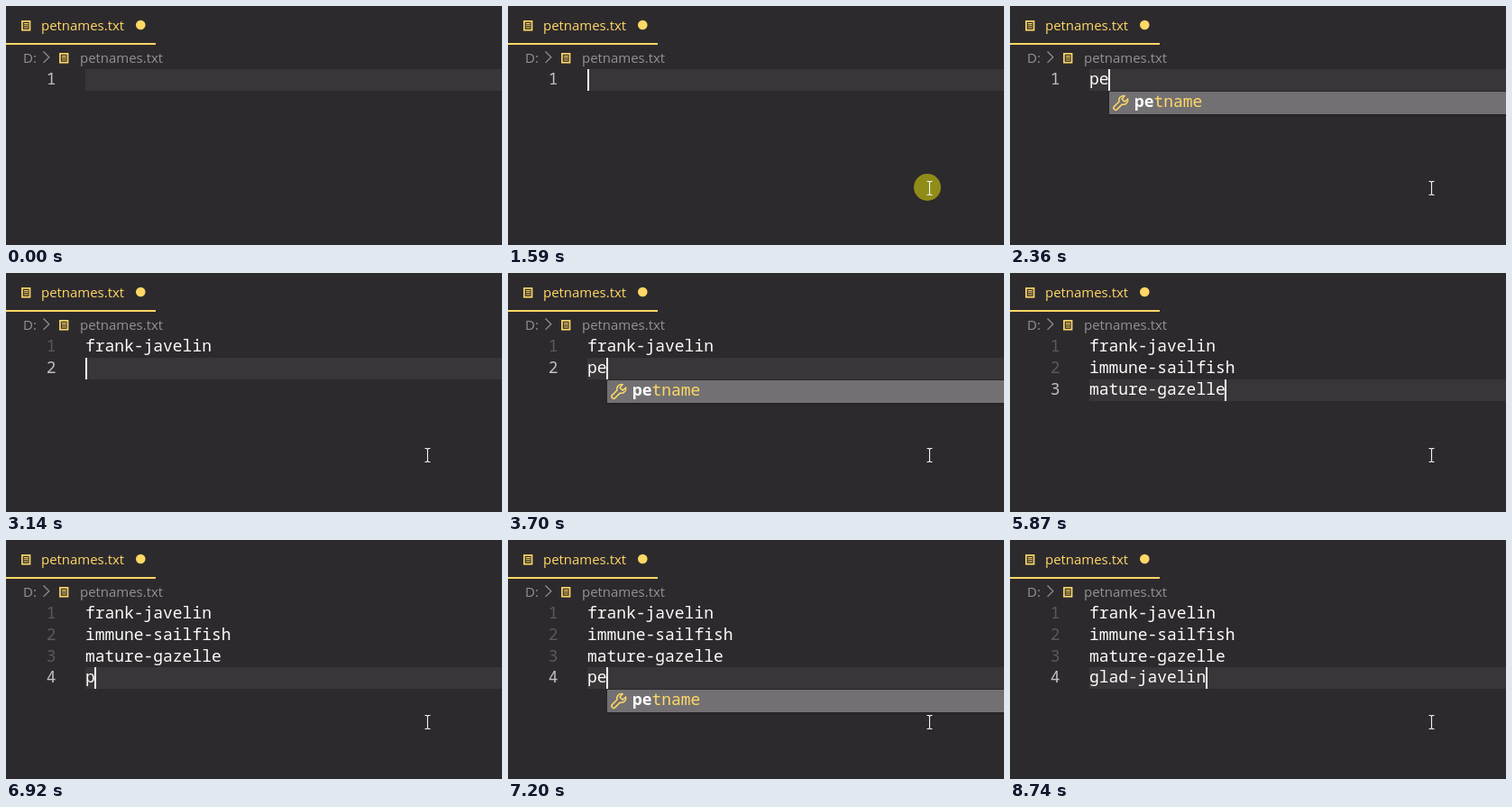
Recreate the animation shown at these times as an HTML page. Size 550 by 265 pixels, loop 9.09 s.

```html
<!DOCTYPE html>
<html lang="en">
<head>
<meta charset="utf-8">
<title>petnames.txt</title>
<style>
  html, body { margin: 0; width: 100%; height: 100%; overflow: hidden; background: #2d2a2e; }
  svg { display: block; width: 550px; height: 265px; }
  .ui { font: 14.95px "Open Sans", "Noto Sans", sans-serif; }
  .code { font: 500 17.95px "Noto Sans Mono", "DejaVu Sans Mono", monospace; fill: #fcfcfa; white-space: pre; }
  .num { font-weight: 400; text-anchor: end; }
  .hit { font-weight: 700; fill: #fff; }
</style>
</head>
<body>
<svg viewBox="0 0 550 265">
  <defs>
    <g id="file" fill="none" stroke="#ffd866">
      <rect x=".9" y=".9" width="8.6" height="9.8" stroke-width="1.7"/>
      <path d="M2.8 3.6h5M2.8 5.8h5M2.8 8h5" stroke-width="1.1"/>
    </g>
    <filter id="shade" x="-5%" y="-30%" width="110%" height="170%">
      <feDropShadow dx="0" dy="1" stdDeviation="1.2" flood-color="#19181a" flood-opacity=".8"/>
    </filter>
  </defs>
  <rect width="550" height="265" fill="#2d2a2e"/>

  <use href="#file" x="17" y="16"/>
  <text class="ui" x="39" y="26.5" fill="#ffd866">petnames.txt</text>
  <circle cx="149.3" cy="21" r="5.3" fill="#ffd866"/>
  <rect y="41" width="166" height="2" fill="#ffd866"/>

  <g class="ui" fill="#939293">
    <text x="19" y="63">D:</text>
    <path d="M41.5 50.5l6.3 6.2-6.3 6.2" fill="none" stroke="#939293" stroke-width="1.2"/>
    <text x="82" y="63">petnames.txt</text>
  </g>
  <use href="#file" x="59" y="52"/>

  <rect id="row" x="88" width="462" height="24" fill="#393639"/>
  <g id="lines"></g>
  <rect id="caret" width="2" height="24" fill="#fcfcfa"/>

  <g id="menu">
    <rect y="1" width="480" height="25" fill="#727072" filter="url(#shade)"/>
    <path d="M13.2 1.6A5.1 5.1 0 0 0 7 8L1.6 13.4A2.2 2.2 0 0 0 4.7 16.6L10.2 11.1A5.1 5.1 0 0 0 16.6 5L13.2 8.2 10.1 5.1Z"
      transform="translate(4 4)" fill="none" stroke="#ffd866" stroke-width="1.5" stroke-linejoin="round"/>
    <text class="code" x="28" y="18" style="fill:#ffd866"><tspan id="hit" class="hit"></tspan><tspan id="rest"></tspan></text>
  </g>

  <g id="mouse">
    <circle id="click" cx="-2" cy="-1" r="15" fill="#908c18"/>
    <path d="M-3 -7.5H-1L0 -6.5 1 -7.5H3M0 -6.5V6.5M-3 7.5H-1L0 6.5 1 7.5H3" transform="translate(.5 0)"
      fill="none" stroke="#f4f4f4" stroke-width="1.1"/>
  </g>
</svg>
<script>
const LOOP = 9090, LEFT = 88, TOP = 70, PITCH = 23.75, CHAR = 10.77;
const WORD = 'petname';
const names = ['frank-javelin', 'immune-sailfish', 'mature-gazelle', 'glad-javelin'];

// start time, line, typed text, caret visible, menu open
const edits = [
  [0, 0, '', 0, 0],
  [1590, 0, '', 1, 0],
  [2080, 0, 'p', 1, 1],
  [2360, 0, 'pe', 1, 1],
  [2720, 0, names[0], 1, 0],
  [3140, 1, '', 1, 0],
  [3490, 1, 'p', 1, 1],
  [3700, 1, 'pe', 1, 1],
  [4190, 1, names[1], 1, 0],
  [4750, 1, names[1], 0, 0],
  [4820, 2, '', 1, 0],
  [5310, 2, '', 0, 0],
  [5800, 2, '', 1, 0],
  [5870, 2, names[2], 1, 0],
  [6360, 2, names[2], 0, 0],
  [6640, 3, '', 1, 0],
  [6920, 3, 'p', 1, 0],
  [6990, 3, 'p', 1, 1],
  [7200, 3, 'pe', 1, 1],
  [7690, 3, names[3], 1, 0],
  [8250, 3, names[3], 0, 0],
  [8740, 3, names[3], 1, 0]
];
// start time, x, y
const moves = [[70, 473, 253], [140, 471, 234], [200, 468, 212], [270, 467, 202]];

const $ = id => document.getElementById(id);
const show = (el, on) => el.setAttribute('visibility', on ? 'visible' : 'hidden');
const place = (el, x, y) => el.setAttribute('transform', `translate(${x} ${y})`);
const latest = (list, t) => list.filter(e => e[0] <= t).pop();
const rowTop = i => Math.round(TOP + i * PITCH);

function addText(cls, x, y, content) {
  const el = document.createElementNS('http://www.w3.org/2000/svg', 'text');
  el.setAttribute('class', cls);
  el.setAttribute('x', x);
  el.setAttribute('y', y);
  el.textContent = content;
  return $('lines').appendChild(el);
}

const rows = names.map((_, i) => ({
  num: addText('code num', 55.5, rowTop(i) + 17, i + 1),
  text: addText('code', LEFT, rowTop(i) + 17, '')
}));

function draw(t) {
  const [, line, typed, caret, menu] = latest(edits, t);
  const y = rowTop(line), x = LEFT + typed.length * CHAR;

  rows.forEach(({ num, text }, i) => {
    show(num, i <= line);
    num.style.fill = i === line ? '#c1c0c0' : '#5b595c';
    text.textContent = i < line ? names[i] : i === line ? typed : '';
  });
  $('row').setAttribute('y', y);
  $('caret').setAttribute('x', Math.floor(x));
  $('caret').setAttribute('y', y);
  show($('caret'), caret);

  show($('menu'), menu);
  place($('menu'), Math.round(x), y + 24);
  $('hit').textContent = menu ? typed : '';
  $('rest').textContent = menu ? WORD.slice(typed.length) : '';

  const move = latest(moves, t);
  show($('mouse'), move);
  if (move) place($('mouse'), move[1], move[2]);
  show($('click'), t >= 1590 && t < 1800);
}

const start = performance.now();
function tick() {
  draw((performance.now() - start) % LOOP);
  requestAnimationFrame(tick);
}
tick();
</script>
</body>
</html>
```
